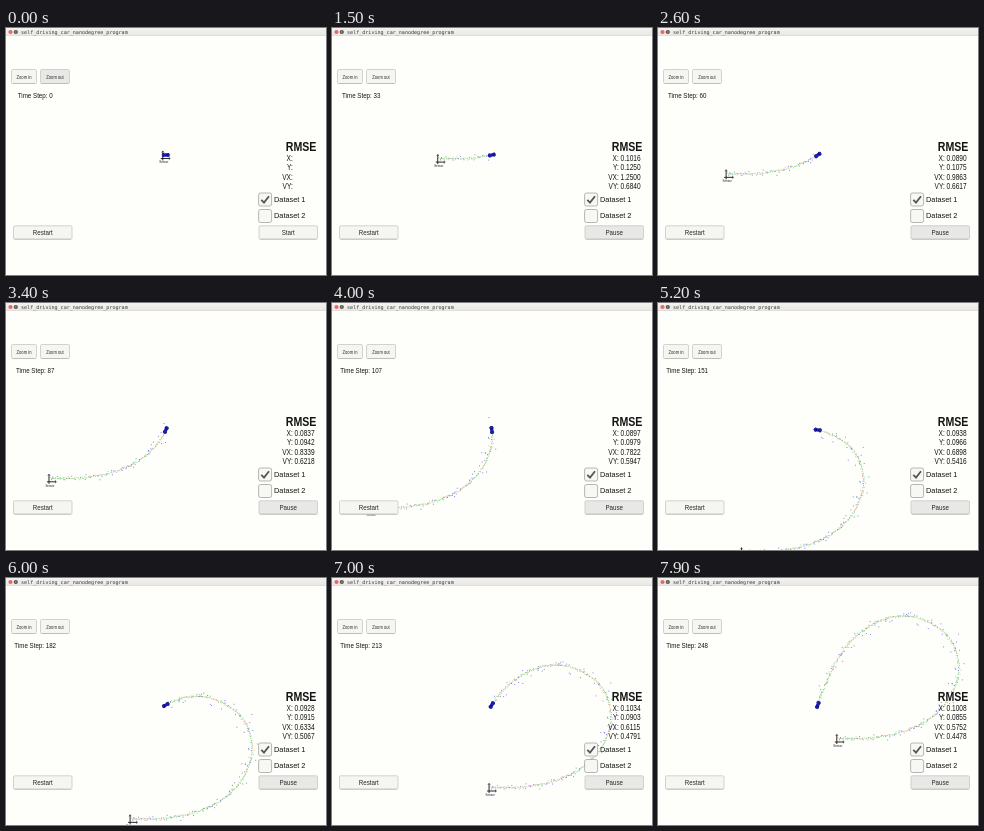
Recreate the animation shown at these times as an HTML page with a canvas. Size 320 by 247 pixels, loop 8 s.

```html
<!DOCTYPE html>
<html lang="en">
<head>
<meta charset="utf-8">
<title>Tracking simulator</title>
<style>
html, body { margin: 0; width: 320px; height: 247px; overflow: hidden; background: #fefefa; }
canvas { display: block; width: 320px; height: 247px; }
</style>
</head>
<body>
<canvas id="stage"></canvas>
<script>
const W = 320, H = 247, LOOP = 8000, TICK = 100;
const START = 900, STEADY = 1900, LAST = 248;
const CAR = { x: 159.8, y: 127 };
const SANS = '"Liberation Sans", Arial, sans-serif';
const MONO = '"DejaVu Sans Mono", monospace';
const PLAIN = '#f5f5f2', PRESSED = '#e8e8e6', INK = '#141414';

const canvas = document.getElementById('stage');
const ctx = canvas.getContext('2d');
const dpr = window.devicePixelRatio || 1;
canvas.width = W * dpr;
canvas.height = H * dpr;

// time, step, then the errors in X, Y, VX, VY
const LOG = [
  [START, 29, .104, .128, 1.31, .69],
  [STEADY, 36, .100, .123, 1.21, .68],
  [2600, 60, .0890, .1075, .9863, .6617],
  [3400, 87, .0837, .0942, .8339, .6218],
  [4500, 124, .0947, .1010, .7391, .5722],
  [6000, 182, .0928, .0915, .6334, .5067],
  [7000, 213, .1034, .0903, .6115, .4791],
  [7900, LAST, .1008, .0855, .5752, .4478]
];

// points at equal step intervals, relative to the sensor
const ROUTE = [[2, -1.5], [33, -2], [66, -8.5], [93, -22], [113, -44], [121.2, -74],
  [111, -102], [84, -121], [55.5, -123], [30, -112.5], [7.2, -92], [-8.5, -64], [-20, -35]];

function readout(t) {
  const i = Math.max(1, LOG.findIndex(row => row[0] >= t));
  const a = LOG[i - 1], b = LOG[i], u = (t - a[0]) / (b[0] - a[0]);
  return a.map((v, k) => v + (b[k] - v) * u);
}

// Catmull-Rom spline
function route(step) {
  const n = ROUTE.length - 1, s = Math.max(0, Math.min(1, step / LAST)) * n;
  const i = Math.min(n - 1, Math.floor(s)), u = s - i;
  const point = k => ROUTE[Math.max(0, Math.min(n, k))];
  const [x, y] = [0, 1].map(c => {
    const [p, a, b, q] = [-1, 0, 1, 2].map(d => point(i + d)[c]);
    return a + u / 2 * (b - p + u * (2 * p - 5 * a + 4 * b - q + u * (3 * (a - b) + q - p)));
  });
  return { x, y };
}

let seed = 71;
const random = () => (seed = seed * 16807 % 2147483647) / 2147483647;
const gauss = () => Math.sqrt(-2 * Math.log(random())) * Math.cos(2 * Math.PI * random());

// lidar and radar readings alternate, each with an estimate
const marks = Array.from({ length: LAST + 1 }, (_, step) => {
  const p = route(step), radar = step % 2 === 1;
  const spread = radar ? 1 + Math.hypot(p.x, p.y) * .018 : .9;
  return {
    x: p.x + gauss() * spread, y: p.y + gauss() * spread,
    ex: p.x + gauss() * .4, ey: p.y + gauss() * .4,
    color: radar ? 'rgba(70,70,225,.7)' : 'rgba(235,90,100,.5)'
  };
});

function text(str, x, y, size, { align = 'left', narrow = 1, weight = '', font = SANS, color = INK } = {}) {
  ctx.save();
  ctx.translate(x, y);
  ctx.scale(narrow, 1);
  ctx.font = `${weight} ${size}px ${font}`;
  ctx.textAlign = align;
  ctx.fillStyle = color;
  ctx.fillText(str, 0, 0);
  ctx.restore();
}

function box(x, y, w, h, r, fill, stroke) {
  ctx.beginPath();
  ctx.roundRect(x, y, w, h, r);
  ctx.fillStyle = fill;
  ctx.fill();
  if (!stroke) return;
  ctx.strokeStyle = stroke;
  ctx.lineWidth = .8;
  ctx.stroke();
}

function line(width, color, ...pts) {
  ctx.beginPath();
  pts.forEach(([x, y]) => ctx.lineTo(x, y));
  ctx.lineWidth = width;
  ctx.strokeStyle = color;
  ctx.stroke();
}

function disc(x, y, r, color) {
  ctx.beginPath();
  ctx.arc(x, y, r, 0, 7);
  ctx.fillStyle = color;
  ctx.fill();
}

function dot(x, y, size, color) {
  ctx.fillStyle = color;
  ctx.fillRect(x - size / 2, y - size / 2, size, size);
}

function button(label, x, y, w, h, fill, size, narrow) {
  box(x, y, w, h, 1.2, fill, '#c8c8c6');
  line(.6, '#b0b0ae', [x + 1, y + h], [x + w - 1, y + h]);
  text(label, x + w / 2, y + h / 2 + size * .36, size, { align: 'center', narrow, color: '#2a2a2a' });
}

function sensor(x, y) {
  ctx.save();
  ctx.translate(x, y);
  line(.9, '#111', [-1, -5.5], [-1, 4]);
  line(.9, '#111', [-3, 2], [6.5, 2]);
  line(.6, '#333', [-2.2, -4], [-1, -5.6], [.2, -4]);
  line(.6, '#333', [5.5, .4], [5.5, 3.4]);
  text('Sensor', 0, 6.7, 2.9, { align: 'center' });
  ctx.restore();
}

function car(heading) {
  ctx.save();
  ctx.translate(CAR.x, CAR.y);
  ctx.rotate(heading);
  for (const x of [-3.2, 1.4]) box(x, -2, 1.8, 4, .4, '#111133');
  box(-4, -1.7, 8, 3.4, 1.2, '#1c1cb4');
  box(.8, -1.1, 1, 2.2, 0, '#0c0c60');
  ctx.restore();
}

function scene(step) {
  const p = route(step), q = route(step - 1), r = route(step + 1);
  const ox = CAR.x - p.x, oy = CAR.y - p.y;
  if (step > 0) {
    for (const m of marks.slice(0, step + 1)) {
      dot(ox + m.x, oy + m.y, .95, m.color);
      dot(ox + m.ex, oy + m.ey, .9, 'rgba(85,205,85,.75)');
    }
  }
  sensor(ox, oy);
  car(Math.atan2(r.y - q.y, r.x - q.x));
}

function titleBar() {
  const g = ctx.createLinearGradient(0, 0, 0, 8);
  g.addColorStop(0, '#f3f2ef');
  g.addColorStop(1, '#e8e7e3');
  ctx.fillStyle = g;
  ctx.fillRect(0, 0, W, 7.6);
  ctx.fillStyle = '#d4d3cf';
  ctx.fillRect(0, 7.4, W, .6);
  disc(4.5, 4, 2.1, '#e8686c');
  disc(9.8, 4, 2.1, '#55534c');
  disc(9.8, 4, .7, '#b0aea8');
  text('self_driving_car_nanodegree_program', 15, 6, 5.07, { font: MONO, color: '#3c3c3c' });
}

function dataset(n, y, checked) {
  box(252.6, y, 13, 13, 2, '#f7f7f4', '#a4a4a2');
  if (checked) line(1.8, '#555', [255.3, y + 6.8], [258, y + 9.6], [263, y + 3.2]);
  text('Dataset ' + n, 268, y + 8.9, 7.35);
}

function panel(t, step, errors) {
  const running = t >= START;
  button('Zoom in', 5.5, 41.5, 25, 14, PLAIN, 5.8, .71);
  button('Zoom out', 34.5, 41.5, 29, 14, running ? PLAIN : PRESSED, 5.8, .71);
  text('Time Step: ' + step, 29.2, 69.5, 6.8, { align: 'center', narrow: .91 });

  text('RMSE', 279.8, 123, 13.6, { weight: 'bold', narrow: .78 });
  ['X', 'Y', 'VX', 'VY'].forEach((name, i) => {
    const y = 133 + i * 9.4;
    text(name + ':', 286.8, y, 9.4, { align: 'right', narrow: .7 });
    if (running) text(errors[i].toFixed(4), 288.6, y, 9.4, { narrow: .7 });
  });

  dataset(1, 165, true);
  dataset(2, 181.5, false);
  button('Restart', 7.5, 197.8, 58.5, 13.4, PLAIN, 6.8, .91);
  button(running ? 'Pause' : 'Start', 253, 197.8, 58.5, 13.4, t >= 500 ? PRESSED : PLAIN, 6.8, .91);
}

// the picture is held between a few moments until it runs steadily
function moment(now) {
  const t = Math.floor(now % LOOP / TICK) * TICK;
  return t >= STEADY ? t : [1500, 1000, START, 500, 0].find(m => m <= t);
}

function draw(now) {
  const t = moment(now);
  const [, value, ...errors] = readout(t);
  const step = t < START ? 0 : Math.round(value);
  ctx.setTransform(dpr, 0, 0, dpr, 0, 0);
  ctx.fillStyle = '#fefefa';
  ctx.fillRect(0, 0, W, H);
  scene(step);
  titleBar();
  panel(t, step, errors);
}

const start = performance.now();
function tick() {
  draw(performance.now() - start);
  requestAnimationFrame(tick);
}
tick();
</script>
</body>
</html>
```
